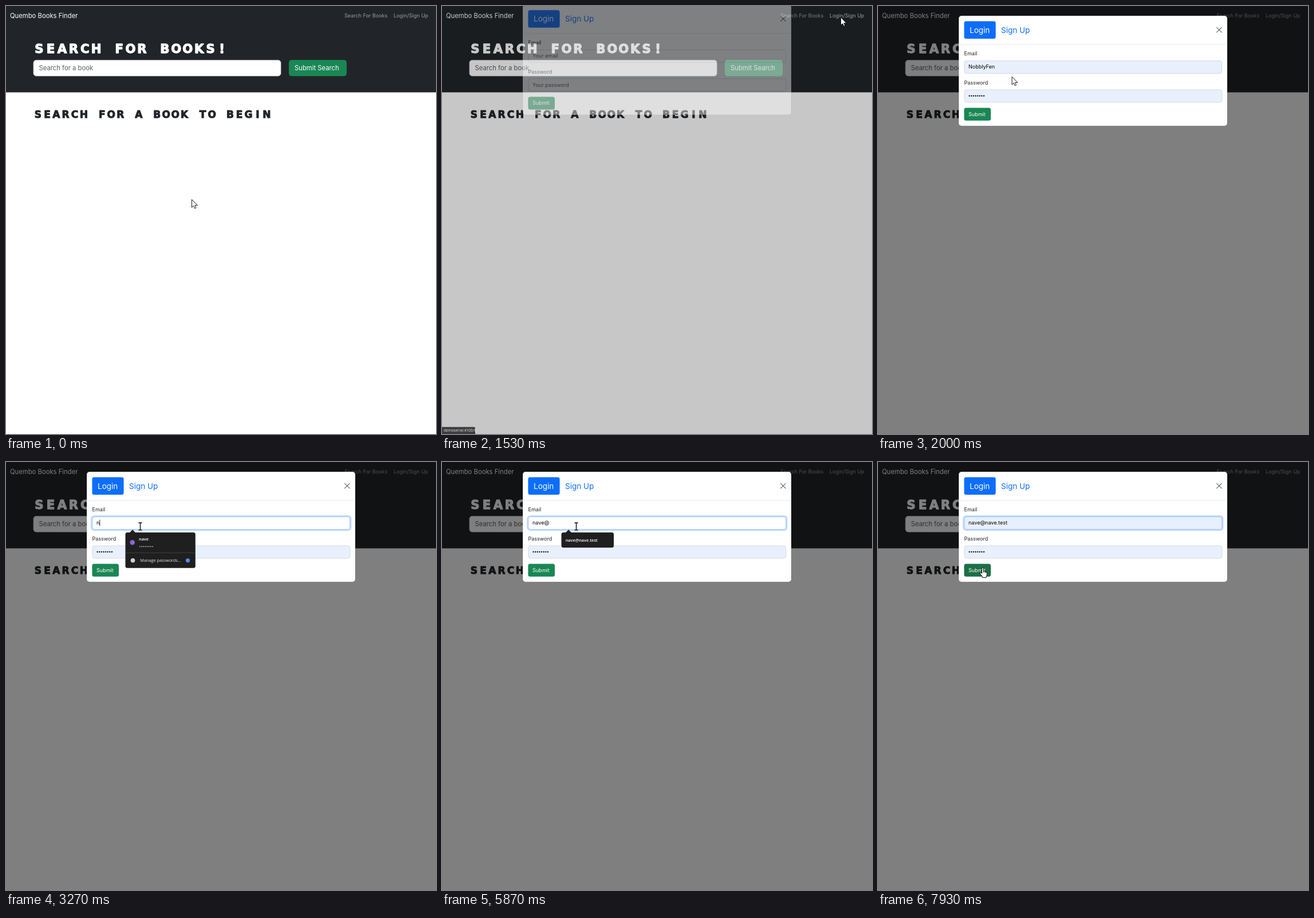
An HTML page that plays this animation: 751x746 px, repeating every 8 s.

```html
<!DOCTYPE html>
<html lang="en">
<head>
<meta charset="utf-8">
<title>Book search login</title>
<style>
  html, body { margin: 0; width: 100%; height: 100%; overflow: hidden; background: #fff; }
  svg { display: block; width: 751px; height: 746px; }
  text { font: 9.03px Inter, sans-serif; fill: #212529; white-space: pre; }
  .mid { font-size: 11.27px; }
  .big { font-size: 13.5px; }
  .white { fill: #fff; }
  .link { fill: #fff; fill-opacity: .55; }
  .hint { fill: #595f66; }
  .block { font: bold 21.2px "DejaVu Sans", sans-serif; text-anchor: middle; stroke-width: 1.3px; stroke-linejoin: round; }
  .block.small { font-size: 17px; stroke-width: 1px; }
  .ui { font: 7.3px "Open Sans", sans-serif; fill: #e8e8e8; }
  .ui.strong { font-weight: 600; fill: #fff; }
  .field { fill: #fff; stroke: #ced4da; stroke-width: .8; }
  .dots { stroke-linecap: round; stroke-width: 2.4; stroke-dasharray: 0 3.62; }
</style>
</head>
<body>
<svg viewBox="0 0 751 746">
  <rect width="751" height="746" fill="#fff"/>
  <rect width="751" height="150.5" fill="#212529"/>
  <text class="mid white" x="7" y="20.5">Quembo Books Finder</text>
  <text class="link" x="591" y="19.5">Search For Books</text>
  <text class="link" id="loginLink" x="677" y="19.5">Login/Sign Up</text>
  <text class="block" data-pitch="19.95" y="81.6" fill="#fff" style="fill:#fff;stroke:#fff">SEARCH FOR BOOKS!</text>
  <rect class="field" x="48" y="94.4" width="432" height="27.6" rx="4.7"/>
  <text class="mid hint" x="57.5" y="112.2">Search for a book</text>
  <rect x="494" y="94" width="101" height="28.3" rx="4.7" fill="#198754"/>
  <text class="mid white" x="504" y="112.2">Submit Search</text>
  <text class="block small" data-pitch="15.98" y="195.3" style="stroke:#212529">SEARCH FOR A BOOK TO BEGIN</text>

  <rect id="backdrop" width="751" height="746"/>

  <g id="modal">
    <rect x="141" y="17" width="469" height="192" rx="4.7" fill="#fff" stroke="#000" stroke-opacity=".2" stroke-width=".6"/>
    <path d="M141 67H610" stroke="#dee2e6" stroke-width=".8"/>
    <rect x="150.4" y="26.5" width="55.2" height="30.5" rx="3.5" fill="#0d6efd"/>
    <text class="big white" x="160" y="46.7">Login</text>
    <text class="big" x="215" y="46.7" style="fill:#0d6efd">Sign Up</text>
    <path d="M591.5 37.3l8.6 8.6m0-8.6l-8.6 8.6" stroke="#000" stroke-opacity=".6" stroke-width="1.2" stroke-linecap="round"/>
    <text x="150.5" y="86.4">Email</text>
    <rect id="ring" x="149.3" y="94.3" width="452.9" height="24.4" rx="4.7" fill="none" stroke="#0d6efd" stroke-opacity=".25" stroke-width="2.4"/>
    <rect id="email" class="field" x="150.8" y="95.6" width="449.9" height="21.8" rx="3.5"/>
    <rect id="selection" x="158" y="100" width="42" height="12" fill="#0078d7"/>
    <text id="emailText" x="158" y="109.4"></text>
    <rect id="caret" y="100.5" width=".9" height="11" fill="#111"/>
    <text x="150.5" y="136.9">Password</text>
    <rect id="password" class="field" x="150.8" y="146" width="449.9" height="21.8" rx="3.5"/>
    <text id="passwordHint" class="hint" x="158" y="160">Your password</text>
    <path id="passwordDots" class="dots" d="M159.6 156.6h26" stroke="#000"/>
    <rect id="submit" x="150.4" y="177.5" width="46.6" height="22.3" rx="3.5"/>
    <text class="white" x="158" y="191.6">Submit</text>
  </g>

  <g id="popups"></g>

  <g id="status">
    <path d="M0 733.7H55.5a2.5 2.5 0 0 1 2.5 2.5V746H0Z" fill="#202124"/>
    <text class="ui white" x="3" y="742.3" style="font-size:6.5px">demoserve:4100/#</text>
  </g>

  <g id="pointer">
    <path id="arrow" d="M.5 .8V14.6L3.6 11.8L5.8 16.3L8 15.3L5.9 10.9H10.3Z" fill="#fff" stroke="#000" stroke-width=".9"/>
    <path id="beam" d="M-3-6h2.2q.8 0 .8.8q0-.8.8-.8H3M0-5.2V5.8M-3 6.6h2.2q.8 0 .8-.8q0 .8.8.8H3" fill="none" stroke="#000" stroke-width="1.3"/>
    <path id="hand" d="M-1.6 1.2Q-1.6-.2-.2-.2T1.2 1.2V5.6Q3.4 4.8 3.8 6.4Q5.4 5.8 5.7 7.1Q7.4 6.7 7.4 8.6V11.5Q7.4 13.3 6 15V17H-.6V15.3L-4.6 10.4Q-5.4 9-4.2 8.4T-1.6 9.6Z M1.2 5.6V8.4M3.8 6.4V8.6M5.7 7.1V9" fill="#fff" stroke="#000" stroke-width=".9" stroke-linejoin="round"/>
  </g>
</svg>

<script>
const LOOP = 8000, FRAME = 200 / 3, ROW = 32;
const $ = id => document.getElementById(id);
const clamp = v => Math.max(0, Math.min(1, v));
const ramp = (t, from, to) => clamp((t - from) / (to - from));
const show = (id, on) => $(id).setAttribute('visibility', on ? 'inherit' : 'hidden');
const fade = (id, v) => $(id).setAttribute('opacity', v);
const latest = (steps, t) => steps.filter(s => s[0] <= t).pop();

// Headings use one equal cell per letter.
for (const el of document.querySelectorAll('[data-pitch]')) {
  const pitch = +el.dataset.pitch;
  el.setAttribute('x', [...el.textContent].map((_, i) => 48 + pitch * (i + .5)).join(' '));
}

const bubble = (w, h) => `
  <path d="M215.5 123.5l5.5-5.5 5.5 5.5Z" fill="#1f1f1f"/>
  <rect x="208.5" y="122.8" width="${w}" height="${h}" rx="3.5" fill="#1f1f1f"/>`;

const account = (name, i) => `<g transform="translate(0 ${i * ROW})">
  <circle cx="220.7" cy="140.3" r="4.3" fill="#8f63d8"/>
  <text class="ui strong" x="232" y="136.8">${name}</text>
  <path class="dots" d="M234 147.3h23" stroke="#ddd" style="stroke-width:1.7;stroke-dasharray:0 3.15"/></g>`;

function accountList(id, names) {
  const extra = (names.length - 1) * ROW;
  return `<g id="${id}">${bubble(122.3, 62 + extra)}${names.map(account).join('')}
    <g transform="translate(0 ${extra})">
      <path d="M208.5 158.2h122.3" stroke="#4a4a4a" stroke-width=".8"/>
      <circle cx="221.5" cy="171.6" r="3.8" fill="#d0d0d0"/>
      <text class="ui" x="234.3" y="174.3">Manage passwords...</text>
      <circle cx="317.5" cy="171.6" r="3.6" fill="#4d8df0"/>
    </g></g>`;
}

$('popups').innerHTML =
  accountList('listBoth', ['NobblyFen', 'nave']) +
  accountList('listOne', ['nave']) +
  `<g id="suggest">${bubble(91.5, 26.4)}
    <rect id="suggestRow" x="208.5" y="126.5" width="91.5" height="19" fill="#3d3d3d"/>
    <text class="ui strong" x="215.7" y="138.5">nave@nave.test</text></g>`;

const typing = [
  [0, 'Your email'], [1667, 'NobblyFen'], [3267, 'n'], [3333, 'na'],
  [3533, 'nav'], [3600, 'nave'], [5333, 'nave@'], [6333, 'nave@nave.test']
];

const path = [
  [0, 324, 336.5], [67, 327, 336.5], [200, 327, 336.5], [1067, 692, 37],
  [1333, 696, 19], [1600, 696, 19], [2000, 233.5, 122.5], [2200, 234.5, 112],
  [7333, 234.5, 112], [7733, 190, 201], [7933, 183, 184.5], [LOOP, 183, 184.5]
];

function pointerAt(t) {
  const i = Math.max(1, path.findIndex(p => p[0] > t));
  const [a, b] = [path[i - 1], path[i]];
  const p = ramp(t, a[0], b[0]), e = p * p * (3 - 2 * p);
  return [a[1] + (b[1] - a[1]) * e, a[2] + (b[2] - a[2]) * e];
}

function drawPointer(t) {
  const [x, y] = pointerAt(t);
  const inModal = t > 1700 && x > 150 && x < 601;
  const beam = inModal && (y > 95 && y < 118 || y > 146 && y < 168);
  const hand = inModal && x < 197 && y > 177 && y < 200;
  $('pointer').setAttribute('transform', `translate(${x} ${y})`);
  show('beam', beam);
  show('hand', hand);
  show('arrow', !beam && !hand);
  $('submit').style.fill = hand ? '#1d6f45' : '#198754';
  $('loginLink').style.fillOpacity = t < 1600 && y < 26 ? .75 : .55;
}

function drawForm(t) {
  const [since, value] = latest(typing, t);
  const filled = t >= 1667 && t < 3267 || t >= 6333;
  const focused = t >= 2200;
  const selected = t >= 2333 && t < 3267;
  const text = $('emailText');
  text.textContent = value;
  text.style.fill = selected ? '#fff' : t < 1667 ? '#595f66' : '#000';
  $('email').style.fill = filled ? '#e8f0fe' : '#fff';
  $('email').style.stroke = focused ? '#86b7fe' : '#ced4da';
  $('password').style.fill = t >= 1667 ? '#e8f0fe' : '#fff';
  show('ring', focused);
  show('selection', selected);
  show('passwordHint', t < 1667);
  show('passwordDots', t >= 1667);

  const width = text.getComputedTextLength();
  if (selected) $('selection').setAttribute('width', width);
  const blinkOn = Math.floor((t - since + 2) / 533) % 2 === 0;
  show('caret', t >= 3267 && t < 6333 && blinkOn);
  $('caret').setAttribute('x', 158 + width);
}

function draw(now) {
  const t = Math.floor((now % LOOP) / FRAME + .1) * FRAME + .5;

  const opened = ramp(t, 1468, 1618);
  const slide = 1 - (1 - ramp(t, 1468, 1768)) ** 1.7;
  const visible = t > 1500;
  fade('backdrop', visible ? opened * .5 : 0);
  fade('modal', visible ? opened : 0);
  $('modal').setAttribute('transform', `translate(0 ${-29.3 * (1 - slide)})`);

  drawForm(t);
  drawPointer(t);

  fade('listBoth', t < 3267 ? ramp(t, 2200, 2467) : 0);
  fade('listOne', t < 3267 ? 0 : 1 - ramp(t, 5267, 5533));
  fade('suggest', ramp(t, 5267, 5533) - ramp(t, 6800, 7067));
  show('suggestRow', t >= 6333);
  fade('status', ramp(t, 1133, 1333) - ramp(t, 1490, 1740));
}

function tick() {
  draw(performance.now());
  requestAnimationFrame(tick);
}
tick();
</script>
</body>
</html>
```
